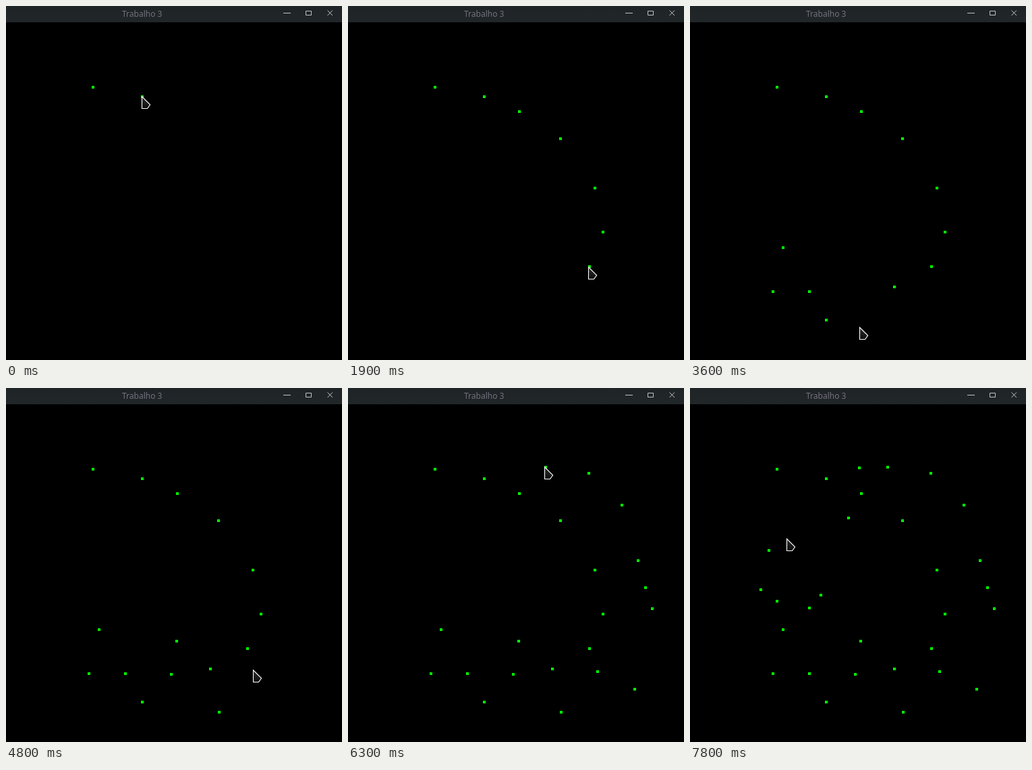
An HTML page for the animation above (8 s loop, 498 by 523 pixels).

```html
<!DOCTYPE html>
<html lang="pt">
<head>
<meta charset="utf-8">
<title>Trabalho 3</title>
<style>
  html, body { margin: 0; width: 100%; height: 100%; overflow: hidden; background: #000; }
  svg { display: block; width: 498px; height: 523px; }
  text { font: 12px "Noto Sans", sans-serif; fill: #73727d; }
</style>
</head>
<body>
<svg viewBox="0 0 498 523">
  <defs>
    <linearGradient id="bar" x2="0" y2="1">
      <stop stop-color="#1f2427"/><stop offset="1" stop-color="#212629"/>
    </linearGradient>
    <linearGradient id="arrow" x2="0" y2="1">
      <stop stop-color="#303030"/><stop offset="1" stop-color="#0c0c0c"/>
    </linearGradient>
  </defs>
  <rect width="498" height="523"/>
  <rect width="498" height="24" fill="url(#bar)"/>
  <text x="172" y="16">Trabalho 3</text>
  <path d="M411 10.5h11M444.5 7.5h8v6h-8zM476.5 6.5l7.5 7.5M484 6.5l-7.5 7.5" fill="none" stroke="#bfc3c6"/>
  <path id="dots" fill="#0f0"/>
  <path id="cursor" d="M.5 .9V18.5H8.5L12.6 12.9Z" fill="url(#arrow)" stroke="#fff" stroke-width="1.1"/>
</svg>
<script>
const LOOP = 8000, TICK = 100;
const keys = [], dots = [{ t: 0, x: 129, y: 120 }];

// Times are in ticks; hold keeps the pointer still for that many more ticks.
function move(t, x, y, hold = 0) {
  keys.push({ t, x, y });
  if (hold) keys.push({ t: t + hold, x, y });
}
const dot = (t, x, y) => dots.push({ t, x, y });
function click(t, x, y, hold) {
  dot(t, x, y);
  move(t, x - 1, y - 1, hold);
}

click(0, 202, 134, 1);
click(4, 254, 156, 2);
click(9, 315, 196);
move(11, 356, 256);
click(12, 366, 269, 1);
click(15, 378, 334);
move(16, 379, 345);
move(17, 370, 355);
dot(19, 358, 385);
move(19, 356, 385);
click(22, 303, 415, 1);
click(26, 177, 422);
move(28, 137, 358, 1);
click(30, 138, 357);
click(32, 123, 422, 1);
click(34, 202, 464, 1);
move(36, 251, 474, 1);
click(39, 316, 479, 1);
click(42, 245, 423, 1);
click(44, 253, 374, 1);
move(46, 300, 390, 1);
move(48, 366, 416, 1);
dot(50, 370, 419);
click(50, 425, 445);
move(51, 435, 429, 1);
click(54, 451, 326, 1);
click(56, 441, 295);
click(57, 430, 255, 1);
click(59, 406, 173, 1);
click(61, 357, 126, 1);
dot(63, 293, 117);
move(63, 291, 116, 1);
click(65, 251, 118, 1);
click(67, 235, 192, 1);
move(69, 214, 250);
click(70, 194, 306, 1);
click(72, 177, 325);
click(73, 129, 315, 1);
dot(75, 105, 298);
move(75, 103, 292, 1);
click(77, 117, 240);
move(78, 143, 222, 2);

const dotsPath = document.getElementById('dots');
const cursor = document.getElementById('cursor');

function pointerAt(tick) {
  const i = keys.findIndex(k => k.t > tick);
  const a = keys[i - 1], b = keys[i];
  const f = (tick - a.t) / (b.t - a.t);
  return [a.x + (b.x - a.x) * f, a.y + (b.y - a.y) * f].map(Math.round);
}

function draw() {
  const tick = Math.floor(performance.now() % LOOP / TICK);
  dotsPath.setAttribute('d', dots.filter(p => p.t <= tick)
    .map(p => `M${p.x - 2} ${p.y - 2}h4v4h-4z`).join(''));
  cursor.setAttribute('transform', `translate(${pointerAt(tick)})`);
  requestAnimationFrame(draw);
}
draw();
</script>
</body>
</html>
```
